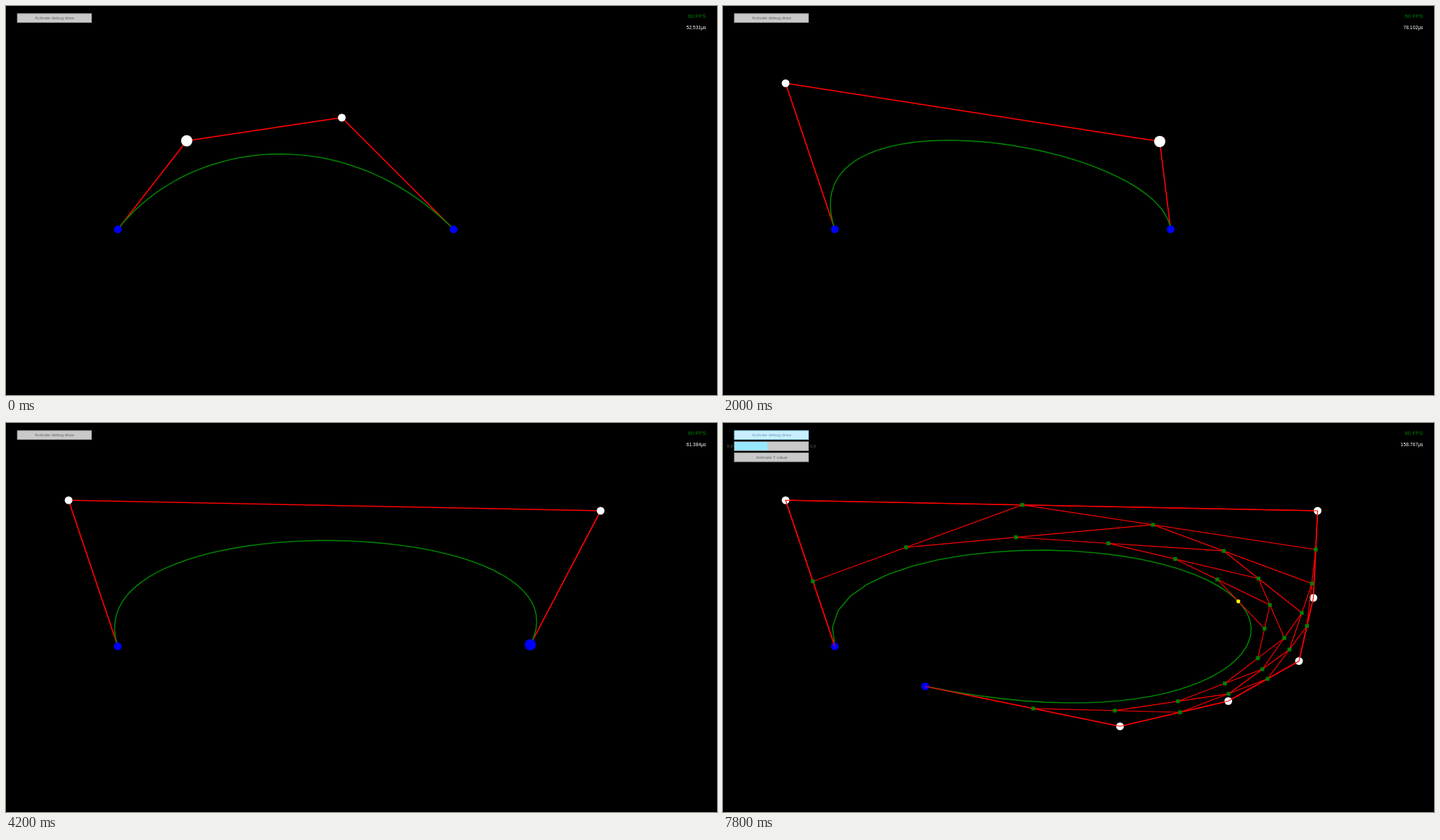
An HTML page with a canvas that plays this animation: 1011x554 px, repeating every 8 s.

```html
<!DOCTYPE html>
<html>
<head>
<meta charset="utf-8">
<style>
  html, body { margin: 0; width: 100%; height: 100%; overflow: hidden; background: #000; }
  canvas { display: block; }
</style>
</head>
<body>
<canvas id="stage" width="1011" height="554"></canvas>
<script>
const ctx = document.getElementById('stage').getContext('2d');
const LOOP = 8000, STEP = 100, SEGMENTS = 50, T_VALUE = 0.445;
const GREEN = '#008000';

// Each point: birth time, hover interval, and keys of [time, x, y].
const points = [
  { keys: [[0, 159, 318]] },
  { hover: [0, 900], keys: [[0, 257, 192], [200, 150, 176], [400, 28, 148], [500, 8, 130], [700, 89, 110]] },
  { hover: [1500, 3000], keys: [[1600, 477.5, 159], [2000, 621, 193], [2400, 745, 180], [2900, 845.5, 125]] },
  { hover: [3700, 4800], keys: [[3800, 636.5, 318], [4100, 715, 324], [4400, 803, 290], [4700, 839.5, 249]] },
  { born: 5100, keys: [[0, 819, 339]] },
  { born: 5500, keys: [[0, 718.5, 396]] },
  { born: 6000, keys: [[0, 564.5, 432]] },
  { born: 6500, keys: [[0, 287.5, 375]] }
];
const timings = ['52.531', '77.672', '78.102', '52.629', '61.384', '83.047', '121.35', '158.767'];

const lerp = (a, b, u) => a.map((v, i) => v + (b[i] - v) * u);

// Cubic Hermite through the keys, at rest at both ends.
function place(keys, t) {
  const last = keys.length - 1;
  if (t <= keys[0][0]) return keys[0].slice(1);
  if (t >= keys[last][0]) return keys[last].slice(1);
  const i = keys.findIndex(k => k[0] > t) - 1;
  const a = keys[i], b = keys[i + 1], span = b[0] - a[0], u = (t - a[0]) / span;
  const slope = (j, c) => j === 0 || j === last ? 0
    : (keys[j + 1][c] - keys[j - 1][c]) / (keys[j + 1][0] - keys[j - 1][0]) * span;
  return [1, 2].map(c => {
    const s = u * u * (3 - 2 * u);
    return a[c] + (b[c] - a[c]) * s
      + slope(i, c) * u * (1 - u) ** 2 - slope(i + 1, c) * u * u * (1 - u);
  });
}

const reduce = (pts, u) => pts.slice(1).map((p, i) => lerp(pts[i], p, u));

function bezier(pts, u) {
  while (pts.length > 1) pts = reduce(pts, u);
  return pts[0];
}

function polyline(pts, color, width) {
  ctx.beginPath();
  pts.forEach(p => ctx.lineTo(...p));
  ctx.strokeStyle = color;
  ctx.lineWidth = width;
  ctx.stroke();
}

function disc([x, y], r, color) {
  ctx.beginPath();
  ctx.arc(x, y, r, 0, 2 * Math.PI);
  ctx.fillStyle = color;
  ctx.fill();
}

function label(text, x, y, size, color, align) {
  ctx.font = size + 'px "Liberation Sans", Arial, sans-serif';
  ctx.textAlign = align;
  ctx.textBaseline = 'alphabetic';
  ctx.fillStyle = color;
  ctx.fillText(text, x, y);
}

const themes = {
  normal: ['#c9c9c9', '#838383', '#686868'],
  focused: ['#c9effe', '#5bb2d9', '#6c9bbc'],
  pressed: ['#97e8ff', '#0492c7', '#368baf']
};

function box(y, text, theme) {
  const [fill, border, ink] = themes[theme];
  ctx.fillStyle = fill;
  ctx.fillRect(15.8, y, 106.2, 13.2);
  ctx.strokeStyle = border;
  ctx.lineWidth = 0.6;
  ctx.strokeRect(16.1, y + 0.3, 105.6, 12.6);
  label(text, 69, y + 8.8, 6.2, ink, 'center');
}

function slider(y) {
  box(y, '', 'normal');
  ctx.fillStyle = '#97e8ff';
  ctx.fillRect(16.5, y + 0.7, 104.5 * T_VALUE, 11.8);
  label('0.0', 14, y + 8.8, 6, '#686868', 'right');
  label('1.0', 123.5, y + 8.8, 6, '#686868', 'left');
}

function construction(pts) {
  const marks = [];
  while (pts.length > 1) {
    polyline(pts, '#f00', 1.2);
    pts = reduce(pts, T_VALUE);
    if (pts.length > 1) marks.push(...pts);
  }
  ctx.fillStyle = GREEN;
  marks.forEach(([x, y]) => ctx.fillRect(x - 2.7, y - 2.7, 5.4, 5.4));
  disc(pts[0], 2.7, '#ff0');
}

function draw(t) {
  const debug = t >= 7800;
  ctx.fillStyle = '#000';
  ctx.fillRect(0, 0, 1011, 554);

  const live = points.filter(p => t >= (p.born || 0));
  const pts = live.map(p => place(p.keys, t));
  polyline(pts, '#f00', 1.7);
  const curve = Array.from({ length: SEGMENTS + 1 }, (_, i) => bezier(pts, i / SEGMENTS));
  polyline(curve, GREEN, 1.6);

  live.forEach(({ hover }, i) => {
    const hot = hover && t >= hover[0] && t < hover[1];
    const end = i === 0 || i === live.length - 1;
    disc(pts[i], hot ? 8 : 5.5, end && !hot ? '#00f' : end ? '#00f' : '#fff');
  });
  if (debug) construction(pts);

  const pressed = t >= 7700 && !debug;
  box(10.6, 'Activate debug draw', pressed ? 'pressed' : t >= 7500 ? 'focused' : 'normal');
  if (debug) {
    slider(26.4);
    box(42.2, 'Animate T value', 'normal');
  }
  label('60 FPS', 995.5, 16.8, 7.8, GREEN, 'right');
  label(timings[Math.floor(t / 1000)] + 'µs', 995.5, 32.6, 6.8, '#fff', 'right');
}

const start = performance.now();
function tick() {
  const t = (performance.now() - start) % LOOP;
  draw(Math.floor(t / STEP) * STEP);
  requestAnimationFrame(tick);
}
tick();
</script>
</body>
</html>
```
